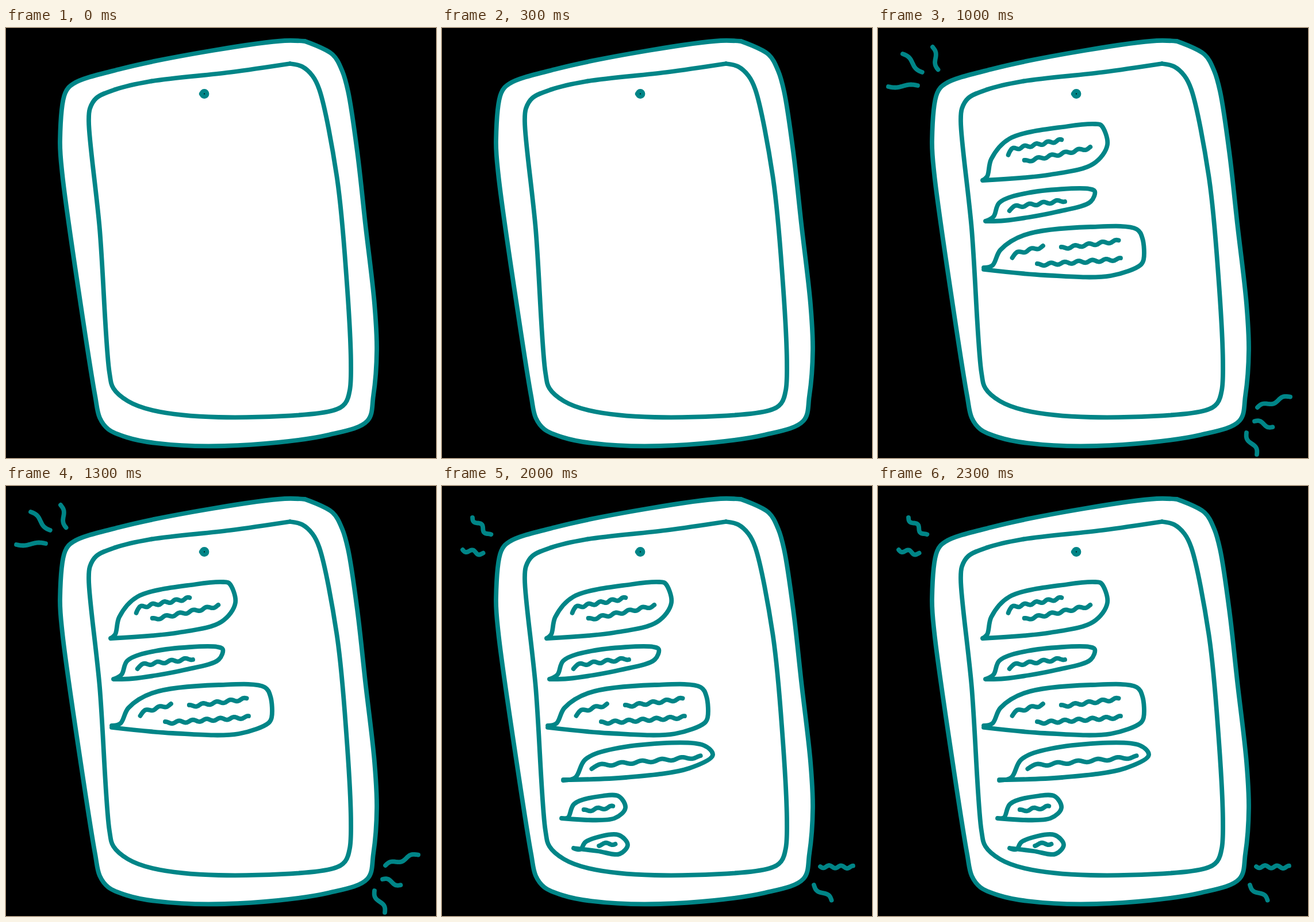
An HTML page that plays this animation: 748x748 px, repeating every 2500 ms.

```html
<!DOCTYPE html>
<html lang="en">
<head>
<meta charset="utf-8">
<title>Phone messages</title>
<style>
  html, body { margin: 0; width: 100%; height: 100%; overflow: hidden; background: #000; }
  svg { display: block; width: 100vw; height: 100vh; }
  path { fill: none; stroke: #008587; stroke-width: 7.8; stroke-linecap: round; stroke-linejoin: round; }
  .body { fill: #fff; }
  .lens { fill: #008587; }
  .pose { visibility: hidden; animation: show 2.5s step-end infinite; animation-delay: calc(var(--i) * .5s - 2.5s); }
  @keyframes show {
    0% { visibility: visible; }
    20%, 100% { visibility: hidden; }
  }
</style>
</head>
<body>
<svg id="stage" viewBox="0 0 748 748"></svg>
<script>
const draw = (d, cls = '') => `<path class="${cls}" d="${d}"/>`;
const dist = (a, b) => Math.hypot(b[0] - a[0], b[1] - a[1]);

// Bezier handle at p, between neighbours q and r, pointing to r (centripetal spline).
function handle(q, p, r) {
  const u = Math.sqrt(dist(q, p)), v = Math.sqrt(dist(p, r));
  if (!u) return p;
  return p.map((c, k) =>
    ((u * u * r[k] - v * v * q[k] + (2 * u * u + 3 * u * v + v * v) * c) / (3 * u * (u + v))).toFixed(1));
}

// Smooth line through a few key points.
function curve(text, cls) {
  const p = text.trim().split(/\s+/).map(s => s.split(',').map(Number));
  let d = 'M' + p[0];
  for (let i = 1; i < p.length; i++) {
    const a = p[i - 1], b = p[i];
    d += `C${handle(p[i - 2] || a, a, b)} ${handle(p[i + 1] || b, b, a)} ${b}`;
  }
  return draw(d, cls);
}

// Line from one point to another that swings sideways by offset(t, distance).
function wavy(x1, y1, x2, y2, offset) {
  const len = Math.hypot(x2 - x1, y2 - y1), pts = [];
  const dx = (x2 - x1) / len, dy = (y2 - y1) / len;
  for (let s = 0; s <= len; s += 1.5) {
    const o = offset(s / len, s);
    pts.push([x1 + dx * s - dy * o, y1 + dy * s + dx * o].map(v => v.toFixed(1)));
  }
  return draw('M' + pts.join('L'));
}

const turn = Math.PI * 2;
// Line of handwriting; a hook bends its start downwards.
const words = (x1, y1, x2, y2, hook = 0, period = 24) => wavy(x1, y1, x2, y2, (t, s) =>
  hook * Math.exp(-s / 4) + (hook ? 2 : -2) * Math.cos(turn * s / period));
const spark = (x1, y1, x2, y2, swing = 3, waves = 1) =>
  wavy(x1, y1, x2, y2, t => swing * Math.sin(turn * waves * t));
const lens = (x, y) => `<g class="lens"><circle cx="${x}" cy="${y}" r="8.4"/>
  <circle cx="${x - 5}" cy="${y}" r="4.3"/><circle cx="${x}" cy="${y}" r="1" fill="#000"/></g>`;

const tilted = curve(`520,23 568,46 585,75 595,110 611,215 625,340 641,480 645,560 639,640 629,683
    560,708 380,727 260,722 210,712 178,698 163,678 155,640 132,495 98,255 94,195 103,113 117,97
    200,71 360,39 485,22 520,23`, 'body')
  + curve(`494,62 515,67 533,83 545,107 576,262 592,430 600,585 598,630 590,653 570,665 370,677
    255,665 212,649 187,627 180,600 163,350 144,163 146,140 157,122 190,107 250,93 390,77 494,62`)
  + lens(345, 114.5);

const upright = curve(`565,47 612,78 628,140 629,260 625,500 609,640 585,715 510,731 390,730 260,714
    150,678 128,655 121,625 115,370 116,200 130,98 143,74 165,64 300,49 460,40 565,47`, 'body')
  + curve(`535,82 556,89 571,106 580,140 590,300 576,535 563,650 556,675 541,687 505,690 390,682
    250,658 200,638 165,611 152,588 152,555 168,305 173,160 175,122 184,102 206,89 310,79 450,84 535,82`)
  + lens(380.5, 114);

const tiltedChat =
  curve('182,265 190,258 197,228 228,193 330,171 378,167 388,169 399,203 375,236 300,255 182,265')
  + words(225, 212, 320, 195, 7, 20.5)
  + words(255, 232, 371, 208)
  + curve('187,336 201,328 211,304 260,287 368,280 377,284 370,302 310,320 220,335 187,336')
  + words(228, 312, 326, 300, 4)
  + curve('184,417 199,413 213,386 255,360 370,346 450,350 460,366 462,403 457,412 405,431 290,430 184,420')
  + words(232, 394, 288, 380, 4)
  + words(319, 383, 420, 370)
  + words(277, 412, 423, 402);

const lateChat =
  curve('211,512 232,507 249,476 300,457 455,451 471,468 430,491 320,507 211,511')
  + words(260, 487, 451, 471, 3, 35)
  + curve('208,578 219,577 230,553 280,539 308,540 319,560 300,578 208,578')
  + words(247, 565, 298, 558)
  + curve('229,630 241,632 250,619 307,607 323,624 309,640 270,635 229,630')
  + words(273, 623, 302, 622, 1);

const firstBubble =
  curve('198,241 209,235 222,202 260,174 302,167 405,170 415,174 423,206 390,238 335,247 198,240')
  + words(247, 196, 345, 189, 6, 20.5)
  + words(275, 217, 394, 210);

const uprightChat =
  curve('194,313 206,310 217,285 240,276 290,274 380,280 389,287 378,306 290,317 194,313')
  + words(236, 296, 336, 296, 3)
  + curve('179,393 197,390 210,365 250,346 380,348 456,361 460,380 456,420 400,435 280,418 179,396')
  + words(230, 377, 288, 370, 3)
  + words(318, 376, 420, 377)
  + words(273, 400, 418, 410)
  + curve('194,488 216,488 237,457 280,447 445,462 458,478 447,492 350,502 240,492 194,492')
  + words(245, 471, 436, 483, 3, 35);

const poses = [
  tilted,
  upright + firstBubble
    + spark(637, 13, 624, 46)
    + spark(643, 71, 704, 38, -3, 2)
    + spark(650, 109, 718, 126, -4.5, 2)
    + spark(51, 623, 92, 645, -2.5)
    + spark(58, 685, 97, 677)
    + spark(117, 693, 122, 726),
  tilted + tiltedChat
    + spark(43, 45, 77, 77, -3)
    + spark(95, 33, 105, 73, -3)
    + spark(18, 102, 69, 100, 2)
    + spark(660, 660, 718, 640, -3, 1.6)
    + spark(655, 684, 687, 694, -3)
    + spark(641, 704, 659, 742, 4),
  upright + firstBubble + uprightChat
    + spark(639, 11, 625, 48, 4)
    + spark(649, 71, 712, 43, -2, 2.5)
    + spark(656, 100, 712, 115, 2.5, 2)
    + spark(55, 620, 91, 639, -3.5)
    + spark(54, 689, 95, 663, -4)
    + spark(111, 685, 104, 725, 5),
  tilted + tiltedChat + lateChat
    + spark(53, 55, 84, 87, 3.5, 1.7)
    + spark(36, 111, 72, 118, 3, 1.6)
    + spark(658, 662, 716, 663, 2.3, 2.8)
    + spark(647, 694, 678, 722, 4)
];

document.getElementById('stage').innerHTML =
  poses.map((art, i) => `<g class="pose" style="--i:${i}">${art}</g>`).join('');
</script>
</body>
</html>
```
